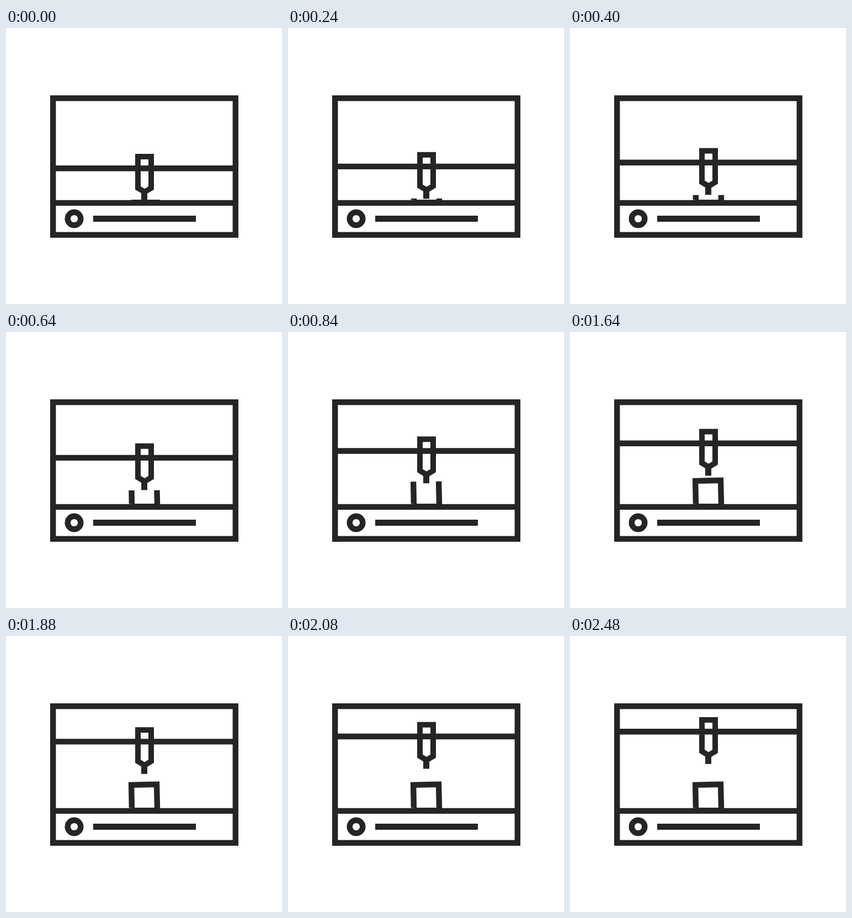
These frames come from a looping animation (500 by 500 pixels, 3 s). An HTML page:

```html
<!DOCTYPE html>
<html lang="en">
<head>
<meta charset="utf-8">
<title>3D printer</title>
<style>
  html, body { margin: 0; height: 100%; overflow: hidden; background: #fff; }
  svg { display: block; width: 100%; height: 100%; }
  svg * { fill: none; stroke: #252525; stroke-width: 10.4; }
</style>
</head>
<body>
<svg viewBox="0 0 500 500">
  <g id="head">
    <path d="M86 26.2H415"/>
    <path d="M239 5H263V61.8L251 69L239 61.8Z" style="stroke-width:10"/>
    <path d="M250.5 69V84.7" style="stroke-width:11"/>
  </g>
  <path class="print" pathLength="1" d="M227.9 311.5L227.1 269.8L250.5 269.3"/>
  <path class="print" pathLength="1" d="M274 311.5L273 268.9L250 269.3"/>
  <path d="M227 316.2H279"/>
  <path d="M86 316.9H415"/>
  <rect x="85.2" y="127.2" width="330.6" height="247.6"/>
  <circle cx="123.5" cy="345.5" r="11.8"/>
  <path d="M158 345.5H344" style="stroke-width:11"/>
</svg>
<script>
const LOOP = 3000, STEP = 40, LAST = 2480;
const head = document.getElementById('head');
const prints = document.querySelectorAll('.print');

// cubic-bezier(.42, 0, .58, 1) over a time span, solved by bisection
function ease(time, start, end) {
  const x = Math.min(1, Math.max(0, (time - start) / (end - start)));
  let low = 0, high = 1, s = x;
  for (let i = 0; i < 20; i++) {
    s = (low + high) / 2;
    const bx = 3 * s * (1 - s) * (0.42 * (1 - s) + 0.58 * s) + s ** 3;
    if (bx < x) low = s; else high = s;
  }
  return x === 0 || x === 1 ? x : s * s * (3 - 2 * s);
}

function draw(now) {
  const time = Math.min(LAST, Math.floor(now % LOOP / STEP) * STEP);
  const y = 228 - 46.7 * ease(time, 25, 1170) - 34.2 * ease(time, 1300, 2500);
  head.setAttribute('transform', `translate(0 ${y.toFixed(2)})`);
  const printed = ease(time, 40, 1440);
  for (const path of prints) {
    path.setAttribute('stroke-dasharray', printed < 1 ? `${printed} 2` : 'none');
  }
}

const begin = performance.now();
function tick() {
  draw(performance.now() - begin);
  requestAnimationFrame(tick);
}
tick();
</script>
</body>
</html>
```
